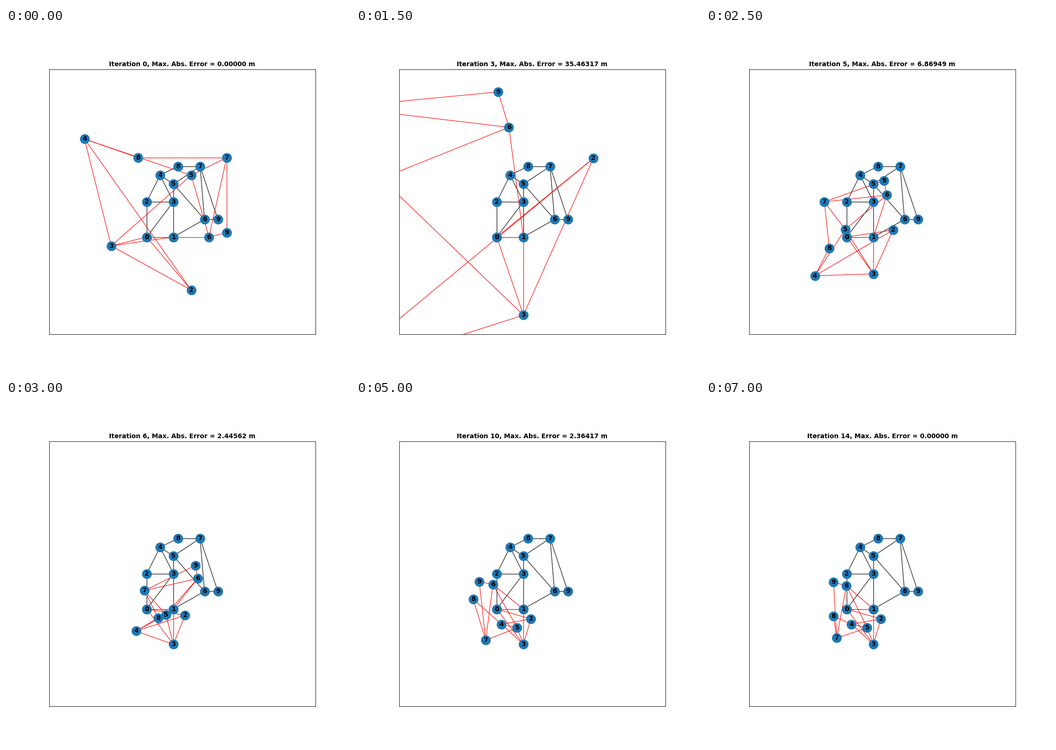
Write a matplotlib script that moves like this. It is 748 px wide and 748 px high and loops after 7.5 s.

```python
import matplotlib.pyplot as plt
import numpy as np
from matplotlib.animation import FuncAnimation
from matplotlib.collections import LineCollection

STEPS = 15
EDGES = np.array([
    (0, 1), (0, 2), (0, 3), (1, 3), (2, 3), (2, 4), (3, 4), (3, 5), (4, 5),
    (1, 6), (5, 6), (5, 7), (6, 7), (4, 8), (7, 8), (6, 9), (7, 9)])
TRUE = np.array([
    (0, 0), (3, 0), (0, 4), (3, 4), (1.5, 7),
    (3, 6), (6.5, 2), (6, 8), (3.5, 8), (8, 2)])
GUESS = np.array([
    (0, 0), (3, 0), (5, -6), (-4, -1), (-7, 11.1),
    (5, 7), (7, 0), (9, 9), (-1, 9), (9, 0.5)])
FIXED = 2  # the first two nodes are anchors


def spans(pos):
    return pos[EDGES[:, 0]] - pos[EDGES[:, 1]]


def lengths(pos):
    return np.hypot(*spans(pos).T)


TARGET = lengths(TRUE)


def newton_step(pos):
    """One Newton step on the squared edge lengths."""
    d = spans(pos)
    rows = np.arange(len(EDGES))
    jac = np.zeros((len(EDGES), len(pos), 2))
    jac[rows, EDGES[:, 0]] = 2 * d
    jac[rows, EDGES[:, 1]] = -2 * d
    jac = jac[1:, FIXED:].reshape(len(EDGES) - 1, -1)
    residual = (TARGET**2 - (d**2).sum(axis=1))[1:]
    new = pos.copy()
    new[FIXED:] += np.linalg.solve(jac, residual).reshape(-1, 2)
    return new


path = [GUESS]
for _ in range(STEPS - 1):
    path.append(newton_step(path[-1]))
errors = [0.0] + [np.abs(lengths(p) - TARGET).max() for p in path[1:]]

fig = plt.figure(figsize=(9, 9), dpi=748 / 9, facecolor="white")
ax = fig.add_axes([0.125, 0.11, 0.775, 0.77])
ax.set(xlim=(-11, 19), ylim=(-11, 19), xticks=[], yticks=[])
ax.set_autoscale_on(False)
title = ax.set_title("", fontsize=12, fontweight="bold")


def add_graph(pos, color):
    lines = LineCollection(pos[EDGES], colors=color, linewidths=1, zorder=1)
    ax.add_collection(lines, autolim=False)
    dots = ax.scatter(*pos.T, s=300, c="#1f78b4", zorder=2)
    labels = [ax.text(x, y, str(i), fontsize=12, fontweight="bold",
                      ha="center", va="center", clip_on=True, zorder=3)
              for i, (x, y) in enumerate(pos)]
    return lines, dots, labels


add_graph(TRUE, "black")
lines, dots, labels = add_graph(GUESS, "red")


def draw(step):
    pos = path[step]
    lines.set_segments(pos[EDGES])
    dots.set_offsets(pos)
    for label, p in zip(labels, pos):
        label.set_position(p)
    title.set_text(
        f"Iteration {step}, Max. Abs. Error = {errors[step]:.5f} m")
    return [lines, dots, title, *labels]


anim = FuncAnimation(fig, draw, frames=STEPS, interval=500, repeat=True,
                     repeat_delay=0, blit=False)
plt.show()
```
